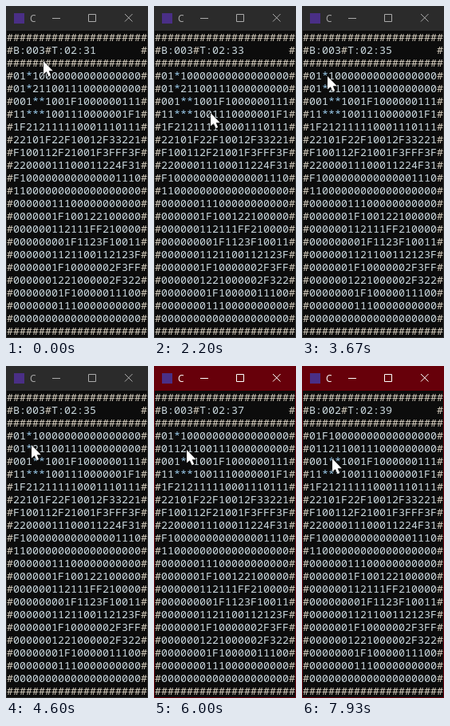
Animation of 178x416 px, one loop 8 s. Source, as an HTML page:

```html
<!DOCTYPE html>
<html lang="en">
<head>
<meta charset="utf-8">
<title>Console minefield</title>
<style>
  html, body { margin: 0; width: 100%; height: 100%; overflow: hidden; background: #0c0c0c; }
  #win {
    --frame: #2b2b2b; --ink: #aaa;
    position: absolute; left: 0; top: 0; width: 178px; height: 416px;
    box-sizing: border-box; overflow: hidden;
    border: 1px solid var(--frame); background: #0c0c0c;
  }
  #win.active { --frame: #67000a; --ink: #fff; }
  #bar { position: absolute; left: 0; top: 0; width: 176px; height: 30px; background: var(--frame); }
  #bar svg { position: absolute; left: -1px; top: -1px; }
  #bar text { font: 12px "Open Sans", sans-serif; fill: var(--ink); }
  #bar path { fill: none; stroke: var(--ink); }
  #screen {
    position: absolute; left: 0; top: 30px; margin: 0;
    font: 500 13.3333px/16px "Noto Sans Mono", monospace;
    color: #cad8de; white-space: pre;
  }
  #screen i { font-style: normal; color: #d8d0c0; }
  #screen b { font-weight: inherit; color: #9cccec; }
  #cursor { position: absolute; left: -1px; top: -1px; overflow: visible; }
</style>
</head>
<body>
<div id="win">
  <div id="bar">
    <svg width="178" height="31">
      <rect x="10" y="9" width="13" height="13" fill="#4a2f86"/>
      <text x="30" y="20">C</text>
      <path d="M58 15.5H68M103.5 10.5H112.5V19.5H103.5ZM149 10L158.5 19.5M158.5 10L149 19.5"/>
    </svg>
  </div>
  <pre id="screen"></pre>
  <svg id="cursor" width="12" height="20">
    <path d="M0 0V16.5L3.8 13.2L6.6 19.2L9.2 18.1L6.7 12.2H11.8Z"
          fill="#fff" stroke="#000" paint-order="stroke"/>
  </svg>
</div>
<script>
const LOOP = 8000, FPS = 15, SIZE = 20;
const ACTIVATE = 4930, REVEAL = 5670, FLAG = 6530;

// Mine columns by row; all other digits are counted from these
const MINES = {
  0: [2], 2: [4, 9], 3: [3, 18], 4: [1], 5: [5, 8, 14],
  6: [0, 7, 13, 15, 16, 17, 19], 7: [17], 8: [0], 11: [7], 12: [12, 13],
  13: [9, 14], 14: [19], 15: [7, 16, 18, 19], 16: [16], 17: [8]
};
// Columns still covered, by row
const COVERED = { 0: [2], 1: [2], 2: [3, 4], 3: [2, 3, 4] };

// Pointer moves: arrival time, duration, x, y
const MOVES = [
  [0, 1, 47, 69], [67, 1, 42, 103], [800, 267, 65, 137], [1200, 200, 75, 138],
  [2667, 533, 41, 104], [3133, 467, 28, 98], [3600, 467, 32, 88],
  [3933, 133, 32, 99], [5133, 133, 37, 103], [5400, 200, 30, 99],
  [6000, 267, 41, 105], [6600, 600, 29, 87], [7200, 467, 53, 112],
  [7533, 333, 38, 116]
];

const win = document.getElementById('win');
const consoleText = document.getElementById('screen');
const cursor = document.getElementById('cursor');

const has = (map, row, col) => (map[row] || []).includes(col);

function countAround(row, col) {
  let count = 0;
  for (let y = row - 1; y <= row + 1; y++)
    for (let x = col - 1; x <= col + 1; x++) count += has(MINES, y, x);
  return count;
}

function cell(row, col, t) {
  const opened = row === 1 && t >= REVEAL;
  const flagged = row === 0 && t >= FLAG;
  if (has(COVERED, row, col) && !opened && !flagged) return '*';
  return has(MINES, row, col) ? 'F' : countAround(row, col);
}

function screenText(t) {
  const line = (_, row) =>
    '#' + Array.from({ length: SIZE }, (_, col) => cell(row, col, t)).join('') + '#';
  const wall = '#'.repeat(SIZE + 2);
  const bombs = t >= FLAG ? 2 : 3;
  const seconds = 31 + Math.floor((t + 335) / 1000);
  const status = `#B:00${bombs}#T:02:${seconds}`.padEnd(SIZE + 1) + '#';
  return [wall, status, wall, ...Array.from({ length: SIZE }, line), wall].join('\n');
}

function pointerAt(t) {
  let x = 0, y = 0;
  for (const [end, duration, toX, toY] of MOVES) {
    const k = Math.min(1, Math.max(0, (t - end) / duration + 1));
    x += (toX - x) * k;
    y += (toY - y) * k;
  }
  return [Math.round(x), Math.round(y)];
}

let shown = '';
function draw() {
  const now = performance.now() % LOOP;
  const t = Math.floor((now + 4) * FPS / 1000) * 1000 / FPS % LOOP + 1;
  const text = screenText(t);
  if (text !== shown) {
    consoleText.innerHTML = text.replace(/#+/g, '<i>$&</i>').replace(/\*+/g, '<b>$&</b>');
    shown = text;
  }
  win.classList.toggle('active', t >= ACTIVATE);
  const [x, y] = pointerAt(t);
  cursor.style.transform = `translate(${x}px, ${y}px)`;
  requestAnimationFrame(draw);
}
draw();
</script>
</body>
</html>
```
